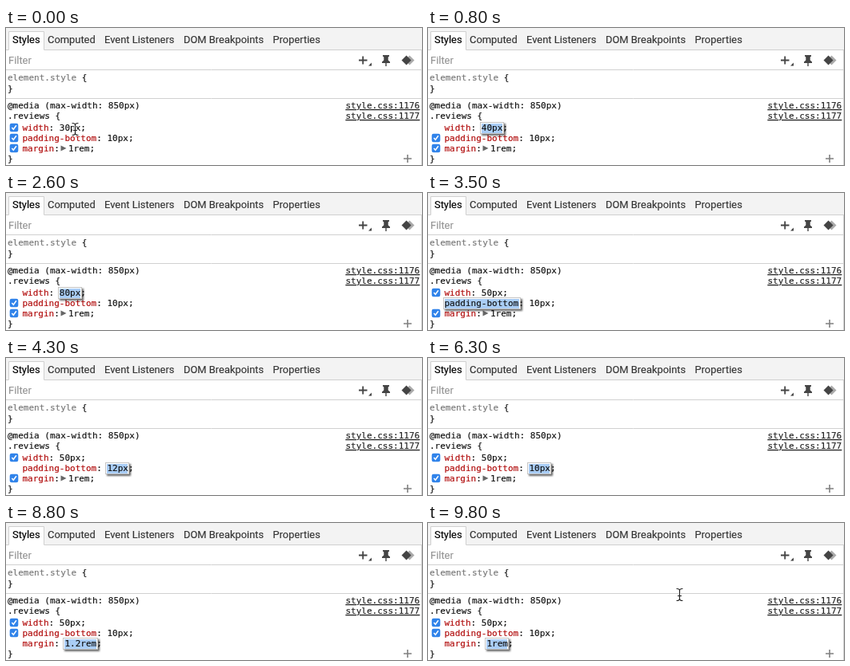
These frames come from a looping animation (520 px wide and 172 px high, 9900 ms). An HTML page:

```html
<!DOCTYPE html>
<html lang="en">
<head>
<meta charset="utf-8">
<title>Style inspector</title>
<style>
  html, body { margin: 0; width: 100%; height: 100%; overflow: hidden; background: #fff; }
  svg { display: block; }
  text { white-space: pre; font: 11px "DejaVu Sans Mono", monospace; color: #111; }
  text, tspan { fill: currentColor; stroke: currentColor; stroke-width: .15px; }
  .ui { font: 12.9px Roboto, sans-serif; color: #333; }
  .active { color: #000; }
  .hint { color: #949494; }
  .dim { color: #777; }
  .name { color: #b00808; }
  .link { text-decoration: underline; color: #222; }
  .line { stroke: #d0d0d0; fill: none; }
  .icon { fill: #444; }
  .box { fill: #fff; stroke: #c4c4c4; filter: drop-shadow(2px 2px 1.2px rgba(0, 0, 0, .6)); }
  .selection { fill: #a9cdf6; }
</style>
</head>
<body>
<svg width="520" height="172" viewBox="0 0 520 172">
  <rect width="520" height="27" fill="#f3f3f3"/>
  <rect x="4" y="5" width="43" height="23" fill="#fff"/>
  <path class="line" d="M0 27.5H3.5V4.5H47.5V27.5H520M0 52.5H520M0 88.5H520M519.5 28V172"/>
  <g id="tabs"></g>
  <text class="ui hint" x="3" y="45">Filter</text>

  <path d="M441 40.5h10.5M446.2 35.5v10" stroke="#444" stroke-width="1.8"/>
  <path class="icon" d="M457 43.5v4h-4z"/>
  <path class="icon" d="M471 34h8v1.5l-1.3 1v4l2.3 2v1.5h-4.3v4h-1.4v-4H470v-1.5l2.3-2v-4l-1.3-1z"/>
  <path d="M504.5 34.5l6 6-6 6-6-6z" fill="#aaa"/>
  <path class="icon" d="M500.5 34.5l6 6-6 6-6-6z"/>

  <text x="2" y="66"><tspan class="dim">element.style</tspan> {</text>
  <text x="2" y="80">}</text>
  <text x="2" y="101">@media (max-width: 850px)</text>
  <text x="2" y="114">.reviews {</text>
  <text x="2" y="168">}</text>
  <text class="link" x="424.5" y="101">style.css:1176</text>
  <text class="link" x="424.5" y="114">style.css:1177</text>
  <path d="M497 164h10M502 159v10" stroke="#808080" stroke-width="1.6"/>

  <g id="rules"></g>
  <g id="cursor" fill="none" stroke-linecap="round">
    <g stroke="#fff" stroke-width="3"><path id="beam" d="M-3.5-7.5Q0-7.5 0-5V5Q0 7.5-3.5 7.5M3.5-7.5Q0-7.5 0-5M0 5Q0 7.5 3.5 7.5M-2 1.5H2"/></g>
    <use href="#beam" stroke="#222" stroke-width="1.2"/>
  </g>
</svg>
<script>
const LOOP = 9900, CHAR = 6.62, LEFT = 20.5;
const $ = id => document.getElementById(id);
const text = (x, y, content, cls = "") => `<text class="${cls}" x="${x}" y="${y}">${content}</text>`;

const tabs = [["Styles", 8], ["Computed", 52], ["Event Listeners", 123], ["DOM Breakpoints", 222], ["Properties", 333.5]];
$("tabs").innerHTML = tabs.map(([label, x], i) => text(x, 19, label, i ? "ui" : "ui active")).join("");

const properties = [
  { name: "width", value: 30, unit: "px", y: 129 },
  { name: "padding-bottom", value: 10, unit: "px", y: 142 },
  { name: "margin", value: 1, unit: "rem", y: 155, shorthand: true },
];

// Each focus: start time, row, edited part.
const focuses = [
  [200, 0, "value"], [3500, 1, "name"], [3700, 1, "value"], [6400, 2, "name"], [6700, 2, "value"],
];

// Per row: step size, times of increments, times of decrements.
const nudges = [
  [10, [800, 1000, 1200, 1400, 1700, 1900], [2500, 2700, 2900, 3100]],
  [1, [4100, 4300, 4500, 4800, 4900], [5200, 5500, 5700, 5900, 6100]],
  [0.1, [7600, 8000, 8300], [8700, 9000, 9200]],
];

const checkbox = y => `<rect x="4.7" y="${y - 9.2}" width="10.6" height="10.4" rx="2.2" fill="#3083ea"/>
  <path d="M7.3 ${y - 4}l2 2.3 3.6-5" fill="none" stroke="#fff" stroke-width="1.5"/>`;

function editor(x, y, content) {
  const left = Math.round(x), width = Math.round(content.length * CHAR);
  return `<rect class="box" x="${left - 1.5}" y="${y - 10.5}" width="${width + 3}" height="14"/>
    <rect class="selection" x="${left}" y="${y - 9}" width="${width}" height="12"/>` + text(x, y, content);
}

function valueAt(row, t) {
  const [step, ups, downs] = nudges[row];
  const passed = times => times.filter(time => time <= t).length;
  const { value, unit } = properties[row];
  return +(value + step * (passed(ups) - passed(downs))).toFixed(1) + unit;
}

function drawRow(row, t, part) {
  const { name, y, shorthand } = properties[row];
  const value = valueAt(row, t);
  const colonX = LEFT + name.length * CHAR;
  const arrow = shorthand && part !== "value";
  const valueX = arrow ? 78 : colonX + 2 * CHAR;
  return (part ? "" : checkbox(y))
    + (part === "name" ? editor(LEFT, y, name) : text(LEFT, y, name, "name"))
    + text(colonX, y, ":")
    + (arrow ? `<path d="M68.5 ${y - 7.5}v7l7-3.5z" fill="#666"/>` : "")
    + (part === "value" ? editor(valueX, y, value) : text(valueX, y, value))
    + text(valueX + value.length * CHAR, y, ";");
}

function cursorAt(t) {
  if (t < 800) return [86.5, 127];
  if (t < 9700) return null;
  return t < 9800 ? [92.5, 128] : [314.5, 90];
}

let lastMarkup;
function frame(now) {
  const t = now % LOOP;
  const [, focusedRow, part] = focuses.findLast(([start]) => start <= t) || [];
  // The edited row goes last so its shadow falls over its neighbours.
  const order = [0, 1, 2].sort((a, b) => (a === focusedRow) - (b === focusedRow));
  const markup = order.map(row => drawRow(row, t, row === focusedRow && part)).join("");
  if (markup !== lastMarkup) $("rules").innerHTML = lastMarkup = markup;

  const position = cursorAt(t);
  $("cursor").setAttribute("visibility", position ? "visible" : "hidden");
  if (position) $("cursor").setAttribute("transform", `translate(${position})`);
  requestAnimationFrame(frame);
}
frame(0);
</script>
</body>
</html>
```
